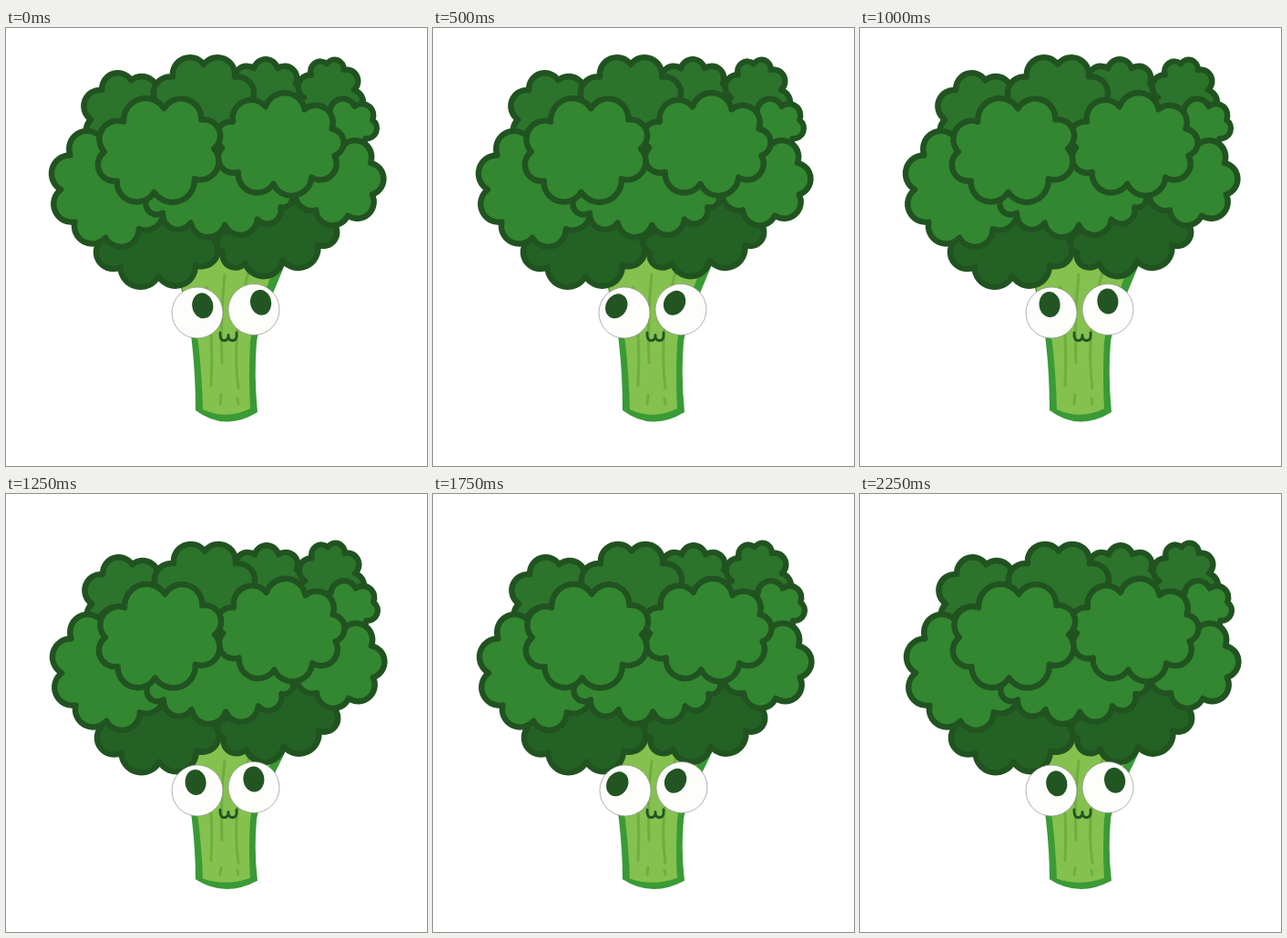
An HTML page that plays this animation: 462x480 px, repeating every 2500 ms.

```html
<!DOCTYPE html>
<html>
<head>
<meta charset="utf-8">
<style>
html, body { margin: 0; width: 100%; height: 100%; overflow: hidden; background: #fff; }
svg { display: block; width: 100vw; height: 100vh; }
</style>
</head>
<body>
<svg viewBox="0 0 462 480">
  <g id="stem"></g>
  <g id="crown" stroke="#215321" stroke-width="6.4" stroke-linejoin="round"></g>
  <g id="face"></g>
</svg>
<script>
const STEP = 250, GAZE = 'RRLLCCCLLR';
const DARK = '#225522', TOP = '#2c742b', FRONT = '#338730', LOW = '#236224';
const rad = deg => deg * Math.PI / 180;

// The head sinks most in the middle; the stem is pressed from the top, its foot stays.
const crownDrop = x => 22.8 - 9 * ((x - 235) / 185) ** 2;
const stemDrop = y => Math.min(12, Math.max(0, (432 - y) * .25)) + Math.max(0, 340 - y) * .15;

// A floret: an ellipse whose rim is split into equal lobes, each one a circular arc.
function floret(down, fill, cx, cy, rx, ry, lobes, phase, tilt = 0) {
  const bulge = .39, cos = Math.cos(rad(tilt)), sin = Math.sin(rad(tilt));
  const rim = i => {
    const a = rad(phase + i * 360 / lobes), u = rx * Math.cos(a), v = ry * Math.sin(a);
    return [cx + down + u * cos - v * sin, cy + down * crownDrop(cx) + u * sin + v * cos];
  };
  let d = 'M' + rim(0);
  for (let i = 0; i < lobes; i++) {
    const [x, y] = rim(i), [u, v] = rim(i + 1);
    const r = Math.hypot(u - x, v - y) * (.25 + bulge * bulge) / (2 * bulge);
    d += `A${r},${r} 0 0 1 ${u},${v}`;
  }
  return `<path fill="${fill}" d="${d}Z"/>`;
}

function drawCrown(down) {
  const add = (...shape) => floret(down, ...shape);
  return `<ellipse cx="232" cy="${170 + down * 22}" rx="130" ry="70" fill="${LOW}"/>` +
    add(TOP, 132, 97, 39, 40, 7, -82) +
    add(TOP, 285, 80, 38, 38, 9, -70) +
    add(TOP, 217, 86, 48, 46, 8, 0) +
    add(TOP, 355, 79, 28, 40, 9, -96) +
    add(LOW, 165, 225, 64, 47, 9, 88) +
    add(LOW, 298, 225, 64, 30, 9, 12, -15) +
    add(FRONT, 375, 106, 28, 21, 6, -74) +
    add(FRONT, 115, 173, 55, 57, 9, 96) +
    add(FRONT, 364, 167, 41, 40, 7, -80) +
    add(FRONT, 232, 178, 79, 38, 13, 1) +
    add(FRONT, 300, 128, 63, 43, 9, -144) +
    add(FRONT, 168, 134, 61, 45, 8, 14, -12);
}

function drawStem(down) {
  const squash = d => d.replace(/(\d+),(\d+)/g, (_, x, y) => `${x},${+y + down * stemDrop(+y)}`);
  const rind = squash('M186,225 V262 C193,290 202,318 204,345 Q208,380 208,419 Q240,443 276,421 Q272,380 275,345 C278,322 293,292 309,252 V225 Z');
  const flesh = squash('M186,225 V262 C195,295 208,318 211,345 Q215,380 216,418 Q242,430 268,417 Q266,380 268,345 C271,318 285,290 298,252 V225 Z');
  const grain = squash('M220,284 Q228,340 225,392 M240,270 Q235,320 237,367 M266,268 Q247,335 255,395 M236,402 L235,412 M254,406 L255,412');
  return `<path fill="#3a9a36" d="${rind}"/><path fill="#85c14e" d="${flesh}"/>` +
    `<path d="${grain}" fill="none" stroke="#6fad40" stroke-width="3" stroke-linecap="round"/>`;
}

function drawFace(look, down) {
  const [dx, dy, tilt] = { R: [6.7, -7.7, -10], L: [-7.8, -7.2, 30], C: [-1, -9, -5] }[look];
  const eye = (x, y, side) =>
    `<g transform="translate(${x} ${y})"><circle r="28" fill="#fdfdfc" stroke="#8d938d" stroke-width=".7"/>` +
    `<ellipse rx="11.5" ry="14" fill="${DARK}" transform="translate(${dx + side} ${dy}) rotate(${tilt})"/></g>`;
  const shift = down && look === 'L' ? 1 : 0;
  return `<g transform="translate(${shift} ${down * 13})">${eye(210, 312, -.9)}${eye(272, 308.5, .9)}</g>` +
    `<path transform="translate(0 ${down * 12})" d="M235,334 q-.5,8.500 4.500,8.500 q4.500,0 4.500,-6 q0,6 4.500,6 q5.500,0 4.500,-8.500" ` +
    `fill="none" stroke="${DARK}" stroke-width="2.8" stroke-linecap="round" stroke-linejoin="round"/>`;
}

const [stem, crown, face] = ['stem', 'crown', 'face'].map(id => document.getElementById(id));
let shown = -1;

function draw(time) {
  const pose = Math.floor(time / STEP) % GAZE.length;
  if (pose === shown) return;
  shown = pose;
  const down = pose % 2;
  stem.innerHTML = drawStem(down);
  crown.innerHTML = drawCrown(down);
  face.innerHTML = drawFace(GAZE[pose], down);
}

const start = performance.now();
function tick() {
  draw(performance.now() - start);
  requestAnimationFrame(tick);
}
tick();
</script>
</body>
</html>
```
